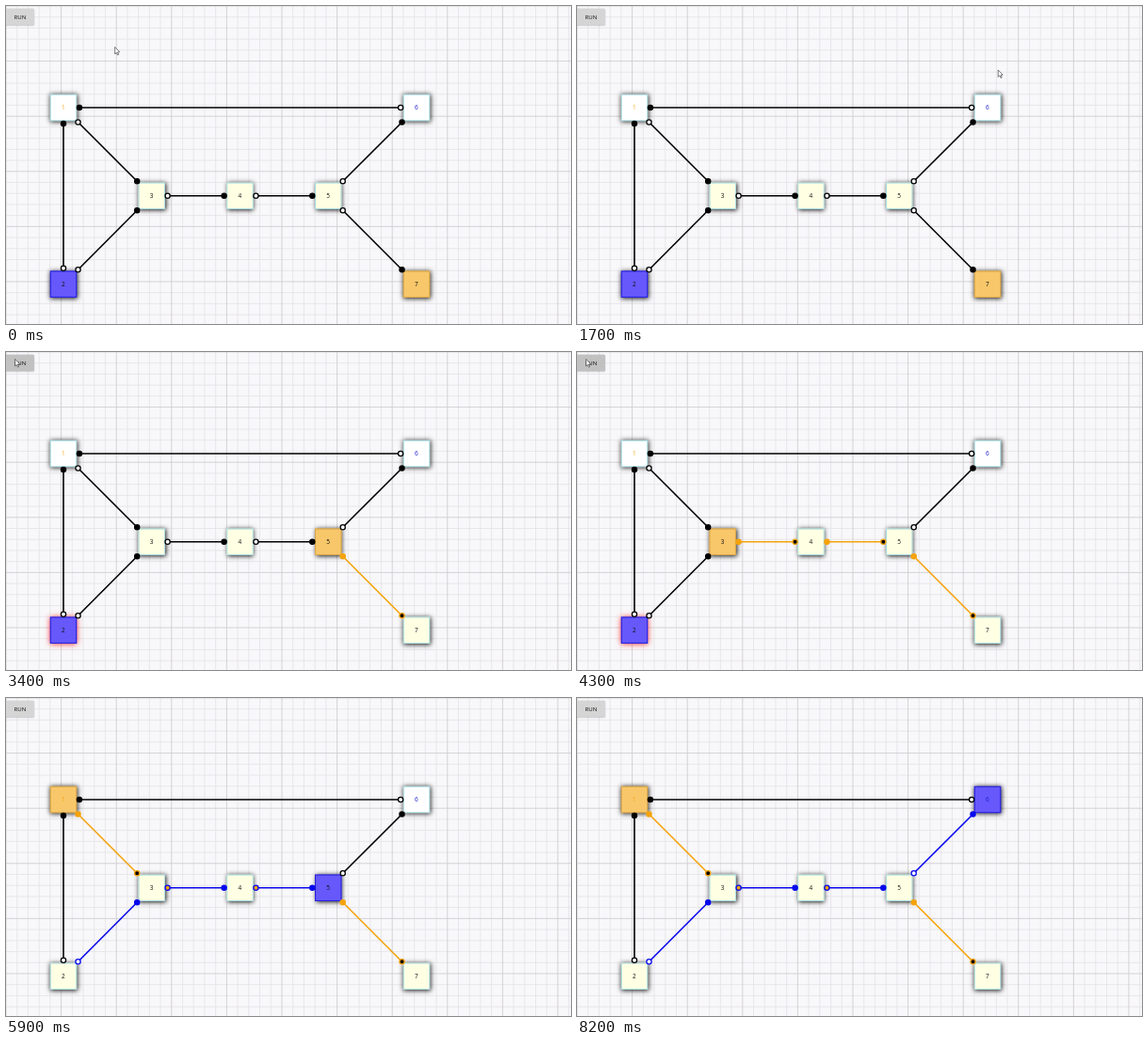
These frames come from a looping animation (600x338 px, 8300 ms). An HTML page with a canvas:

```html
<!DOCTYPE html>
<html lang="en">
<head>
<meta charset="utf-8">
<title>Graph run</title>
<style>
html, body { margin: 0; width: 100%; height: 100%; overflow: hidden; background: #f8f7f9; }
canvas { display: block; }
</style>
</head>
<body>
<canvas id="stage" width="600" height="338"></canvas>
<script>
const ctx = document.getElementById('stage').getContext('2d');
const LOOP = 8300;
const ORANGE = '#f5a30b', BLUE = '#0808ee', BLACK = '#000';
const FONT = '"Open Sans", "Noto Sans", sans-serif';

const nodes = {
  1: { x: 61, y: 108, fill: '#fff', text: ORANGE },
  2: { x: 61, y: 295.7 },
  3: { x: 154.7, y: 201.8 },
  4: { x: 248.5, y: 201.8 },
  5: { x: 342.2, y: 201.8 },
  6: { x: 436, y: 108, fill: '#fff', text: '#1c1ccf' },
  7: { x: 436, y: 295.7 }
};

// Each edge runs from its hollow end to its filled end.
const edges = [[6, 1], [2, 1], [1, 3], [2, 3], [3, 4], [4, 5], [5, 6], [5, 7]];

const agents = [
  { start: 7, color: ORANGE, fill: '#f8c76a', border: '#d9a548' },
  { start: 2, color: BLUE, fill: '#6658fa', border: '#2420dc' }
];

const moves = [
  { t: 3150, agent: 0, to: 5 },
  { t: 3700, agent: 0, to: 4 },
  { t: 4250, agent: 0, to: 3 },
  { t: 4790, agent: 0, to: 1 },
  { t: 4790, agent: 1, to: 3 },
  { t: 5340, agent: 1, to: 4 },
  { t: 5890, agent: 1, to: 5 },
  { t: 6440, agent: 1, to: 6 }
];
const BLOCKED = [3150, 4790];

// Pointer stops: time, x, y.
const pointer = [
  [0, 115.7, 43.6], [150, 115.7, 43.6], [1600, 447.2, 68], [1850, 447.2, 68],
  [2800, 9.6, 7.6], [4600, 9.6, 7.6], [4900, 380.5, 27.7]
];
const POINTER_END = 5000;

const clamp = v => Math.max(0, Math.min(1, v));
const ease = v => v * v * (3 - 2 * v);

function pointerAt(t) {
  const i = pointer.findIndex(p => p[0] > t);
  if (i < 0) return pointer[pointer.length - 1].slice(1);
  const [t0, x0, y0] = pointer[i - 1], [t1, x1, y1] = pointer[i];
  const k = ease((t - t0) / (t1 - t0));
  return [x0 + (x1 - x0) * k, y0 + (y1 - y0) * k];
}

function stateAt(t) {
  const at = agents.map(a => a.start);
  const links = edges.map(() => ({ line: BLACK, fills: ['#fff', BLACK] }));
  for (const { t: when, agent, to } of moves) {
    if (when > t) break;
    const from = at[agent];
    const i = edges.findIndex(e => e.includes(from) && e.includes(to));
    links[i].line = agents[agent].color;
    links[i].fills[edges[i].indexOf(to)] = agents[agent].color;
    at[agent] = to;
  }
  return { at, links };
}

function drawGrid() {
  ctx.fillStyle = '#f8f7f9';
  ctx.fillRect(0, 0, 600, 338);
  const step = 600 / 51.2;
  for (const major of [false, true]) {
    ctx.strokeStyle = major ? '#d0cfd2' : '#e6e5e8';
    ctx.lineWidth = 0.9;
    ctx.beginPath();
    for (let i = 0; i * step < 600; i++) {
      if ((i % 5 === 0) !== major) continue;
      const p = i * step;
      ctx.moveTo(p, 0);
      ctx.lineTo(p, 338);
      ctx.moveTo(0, p);
      ctx.lineTo(600, p);
    }
    ctx.stroke();
  }
}

function label(text, x, y, color, size) {
  ctx.font = `${size}px ${FONT}`;
  ctx.textAlign = 'center';
  ctx.textBaseline = 'alphabetic';
  ctx.fillStyle = color;
  ctx.fillText(text, x, y);
}

function drawButton(t) {
  const hover = clamp((t - 2750) / 100) * (1 - clamp((t - 4650) / 600));
  const shade = Math.round(213 - 20 * hover);
  ctx.save();
  ctx.shadowColor = 'rgba(0,0,0,.25)';
  ctx.shadowBlur = 1.5;
  ctx.shadowOffsetY = 0.5;
  ctx.fillStyle = `rgb(${shade},${shade},${shade})`;
  ctx.beginPath();
  ctx.roundRect(-2, 2.8, 32, 17.4, 1.5);
  ctx.fill();
  ctx.restore();
  label('RUN', 15, 14, '#111', 6.1);
}

function drawNode(id, agent, blocked) {
  const { x, y, fill = '#ffffe3', text = '#111' } = nodes[id];
  const left = x - 14.2, top = y - 14.2, size = 28.4;
  ctx.save();
  ctx.shadowColor = blocked ? '#ff2020' : 'rgba(0,0,0,.9)';
  ctx.shadowBlur = blocked ? 6 : 5;
  ctx.shadowOffsetX = ctx.shadowOffsetY = blocked ? 0 : 0.6;
  ctx.fillStyle = agent ? agent.fill : fill;
  ctx.fillRect(left, top, size, size);
  ctx.restore();
  ctx.strokeStyle = agent ? agent.border : '#a9dce2';
  ctx.lineWidth = 1;
  ctx.strokeRect(left + 0.5, top + 0.5, size - 1, size - 1);
  label(id, x - 0.2, y + 2.3, text, 6.4);
}

// Point on the node's outer frame that faces the other node.
function port(id, other) {
  const a = nodes[id], b = nodes[other];
  const dx = Math.sign(b.x - a.x), dy = Math.sign(b.y - a.y);
  const gap = dx && dy ? 15.5 : 16.9;
  return [a.x + dx * gap, a.y + dy * gap];
}

function drawEdge([a, b], { line, fills }) {
  const ends = [port(a, b), port(b, a)];
  ctx.strokeStyle = line;
  ctx.lineWidth = 1.6;
  ctx.beginPath();
  ctx.moveTo(...ends[0]);
  ctx.lineTo(...ends[1]);
  ctx.stroke();
  ctx.lineWidth = 1.3;
  ends.forEach(([x, y], i) => {
    ctx.beginPath();
    ctx.arc(x, y, 2.6, 0, Math.PI * 2);
    ctx.fillStyle = fills[i];
    ctx.fill();
    ctx.stroke();
  });
}

function drawPointer(t) {
  if (t >= POINTER_END) return;
  ctx.save();
  ctx.translate(...pointerAt(t));
  ctx.beginPath();
  ctx.moveTo(0, 0);
  for (const [x, y] of [[0, 7.4], [1.7, 5.9], [2.9, 8.5], [4, 8], [2.9, 5.4], [5, 5.2]]) ctx.lineTo(x, y);
  ctx.closePath();
  ctx.fillStyle = '#fff';
  ctx.fill();
  ctx.strokeStyle = '#444';
  ctx.lineWidth = 0.7;
  ctx.stroke();
  ctx.restore();
}

function draw(t) {
  const { at, links } = stateAt(t);
  const blocked = t >= BLOCKED[0] && t < BLOCKED[1];
  drawGrid();
  drawButton(t);
  for (const id of Object.keys(nodes)) {
    const agent = agents[at.indexOf(Number(id))];
    drawNode(id, agent, blocked && agent === agents[1]);
  }
  edges.forEach((edge, i) => drawEdge(edge, links[i]));
  drawPointer(t);
}

function frame() {
  draw(performance.now() % LOOP);
  requestAnimationFrame(frame);
}
frame();
</script>
</body>
</html>
```
